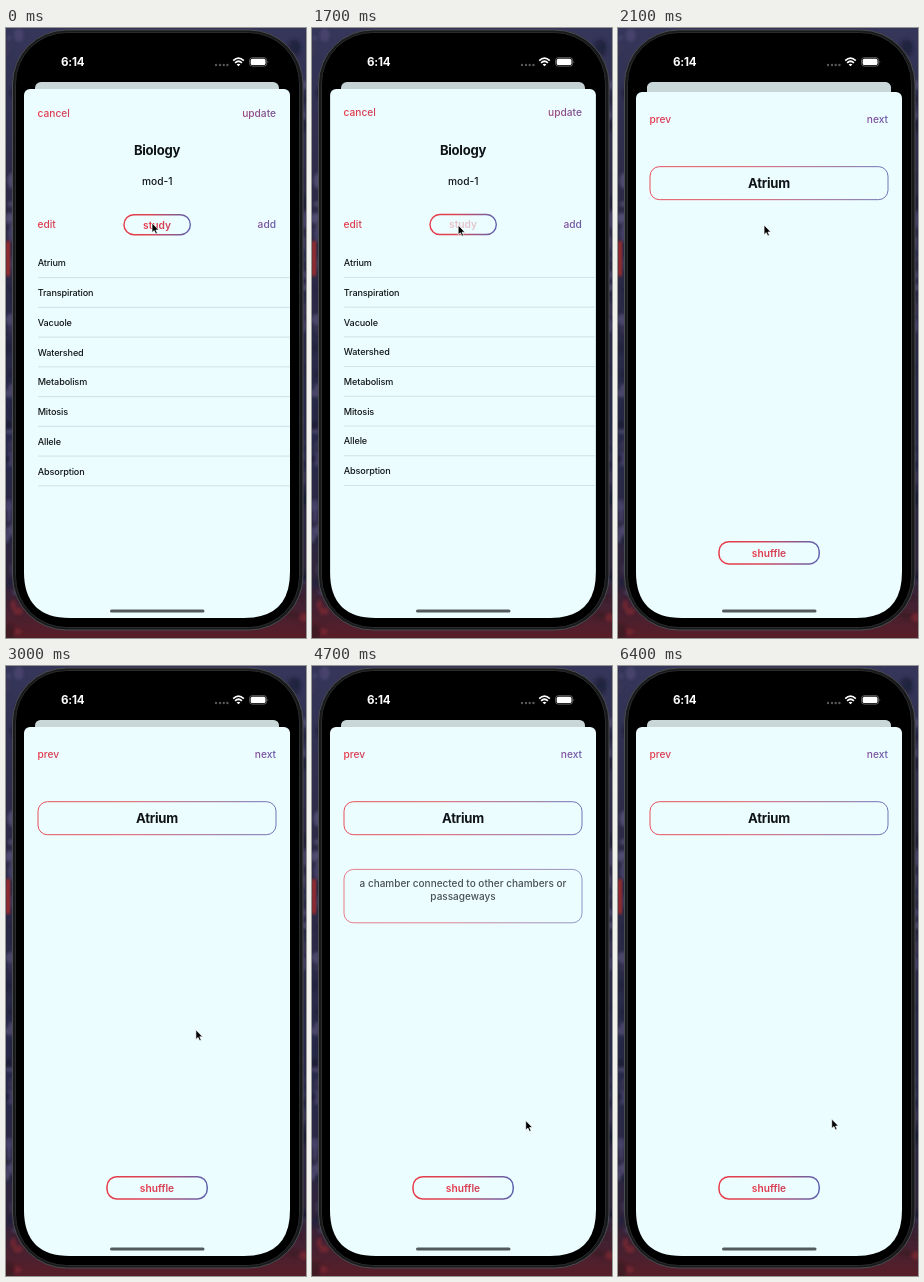
An HTML page that plays this animation: 300 px wide and 610 px high, repeating every 6.5 s.

```html
<!DOCTYPE html>
<html lang="en">
<head>
<meta charset="utf-8">
<title>Flashcards</title>
<style>
  html, body { margin: 0; width: 100%; height: 100%; overflow: hidden; background: #25253c; }
  svg { display: block; width: 300px; height: 610px; font: 500 10.2px Inter, sans-serif; fill: #101416; }
  .title { font-weight: 700; font-size: 13.1px; letter-spacing: -.25px; }
  .row { font-size: 9.1px; letter-spacing: -.12px; }
  .strong { font-weight: 600; }
  .mid { text-anchor: middle; }
  .end { text-anchor: end; }
  .line { fill: none; stroke: url(#edge); }
</style>
</head>
<body>
<svg viewBox="0 0 300 610">
  <defs>
    <linearGradient id="wall" x2="0" y2="1">
      <stop offset="0" stop-color="#35365a"/><stop offset=".3" stop-color="#2c2945"/>
      <stop offset=".7" stop-color="#272a4a"/><stop offset=".9" stop-color="#30243b"/>
      <stop offset="1" stop-color="#581e28"/>
    </linearGradient>
    <linearGradient id="edge">
      <stop offset="0" stop-color="#e63b48"/><stop offset=".4" stop-color="#dc4454"/>
      <stop offset="1" stop-color="#5f63ae"/>
    </linearGradient>
    <linearGradient id="red"><stop stop-color="#e83848"/><stop offset="1" stop-color="#cf4158"/></linearGradient>
    <linearGradient id="plum"><stop stop-color="#a34a7c"/><stop offset="1" stop-color="#775096"/></linearGradient>
    <linearGradient id="violet"><stop stop-color="#86509a"/><stop offset="1" stop-color="#665aa8"/></linearGradient>
    <filter id="soft"><feGaussianBlur stdDeviation="1.5"/></filter>
    <clipPath id="screen"><path d="M18 0H284V544Q284 590 238 590H64Q18 590 18 544Z"/></clipPath>
  </defs>

  <rect width="300" height="610" fill="url(#wall)"/>
  <g id="paint" filter="url(#soft)"></g>
  <rect y="213" width="4" height="35" fill="#a52a2b" filter="url(#soft)"/>

  <rect x="6.5" y="2" width="290.5" height="600" rx="54" fill="#18191b" stroke="#4c4d51"/>
  <rect x="9.5" y="4.5" width="284" height="595" rx="51" fill="#000" stroke="#2b2c2e"/>

  <g fill="#fff">
    <text x="55" y="38.2" font-size="11.6" font-weight="700" letter-spacing="-.2">6:14</text>
    <g fill="#56585a">
      <circle cx="210" cy="37" r="1.2"/><circle cx="214" cy="37" r="1.2"/>
      <circle cx="217.7" cy="37" r="1.2"/><circle cx="221.4" cy="37" r="1.2"/>
    </g>
    <g fill="none" stroke="#fff" stroke-width="1.7">
      <path d="M227.2 32.6Q232.5 27.6 237.8 32.6M229.1 34.9Q232.5 31.6 235.9 34.9"/>
    </g>
    <path d="M230.6 36.4Q232.5 34.9 234.4 36.4L232.5 38.3Z"/>
    <rect x="243.6" y="29.7" width="17" height="8.4" rx="2.6" fill="none" stroke="#77797a" stroke-width=".8"/>
    <rect x="244.7" y="30.8" width="14.8" height="6.2" rx="1.6"/>
    <path d="M261.6 32.5q1.4 1.4 0 2.8z" fill="#77797a"/>
  </g>

  <g clip-path="url(#screen)">
    <rect id="strip" x="29" y="54" width="244" height="40" rx="6" fill="#c9d7d9"/>
    <g id="deck">
      <rect x="18" y="61" width="266" height="560" rx="6" fill="#ecfdff"/>
      <text x="31.5" y="88.5" fill="url(#red)">cancel</text>
      <text class="end" x="270" y="88.5" fill="url(#plum)">update</text>
      <text class="title mid" x="151" y="127">Biology</text>
      <text class="mid" x="151.3" y="156.7">mod-1</text>
      <text x="31.5" y="200.2" fill="url(#red)">edit</text>
      <text class="end" x="270" y="200.2" fill="url(#violet)">add</text>
      <rect class="line" x="118" y="186.7" width="66.3" height="20" rx="9.8" stroke-width="1.4"/>
      <text id="study" class="mid strong" x="151" y="200.6" fill="url(#red)">study</text>
      <g id="rows"></g>
      <rect id="dim" x="18" y="61" width="266" height="560" rx="6" fill="#000"/>
    </g>
    <g id="card">
      <rect x="18" y="61" width="266" height="560" rx="6" fill="#ecfdff"/>
      <text x="31.5" y="92" fill="url(#red)">prev</text>
      <text class="end" x="270" y="92" fill="url(#violet)">next</text>
      <rect class="line" x="32" y="135.7" width="238" height="33" rx="9.5" stroke-width=".9"/>
      <text class="title mid" x="151" y="157.4">Atrium</text>
      <g id="answer">
        <rect class="line" x="32" y="203.4" width="238" height="53.4" rx="9.5" stroke-width=".9"/>
        <text class="mid" font-size="10" x="151" y="221">a chamber connected to other chambers or</text>
        <text class="mid" font-size="10" x="151" y="234">passageways</text>
      </g>
      <rect class="line" x="101" y="510.7" width="100.2" height="22.3" rx="9.8" stroke-width="1.5"/>
      <text class="mid strong" x="151" y="525.6" fill="url(#red)">shuffle</text>
    </g>
  </g>
  <rect x="104" y="581.6" width="94.5" height="3" rx="1.5" fill="#535a5c"/>
  <path id="cursor" d="M0 0V9.6L2.2 7.6L3.8 11L5.4 10.3L3.9 7H6.8Z" fill="#000" stroke="#fff" stroke-width=".7"/>
</svg>
<script>
const LOOP = 6500, STEP = 100;
const el = id => document.getElementById(id);
const clamp = v => Math.min(1, Math.max(0, v));
const ease = v => v * v * (3 - 2 * v);

const terms = ['Atrium', 'Transpiration', 'Vacuole', 'Watershed', 'Metabolism', 'Mitosis', 'Allele', 'Absorption'];
el('rows').innerHTML = terms.map((term, i) => {
  const y = 29.75 * i;
  return `<text class="row" x="31.7" y="${238.3 + y}">${term}</text>
    <path d="M32 ${249.6 + y}H284" stroke="#cfdfe2" stroke-width=".9"/>`;
}).join('');

// Blurred wallpaper strokes along the visible margins
let seed = 11;
const random = () => (seed = seed * 16807 % 2147483647) / 2147483647;
const tones = ['#4d4872', '#171a30', '#3d3555', '#20213d', '#545075'];
el('paint').innerHTML = Array.from({ length: 120 }, () => {
  const x = random() < .5 ? random() * 16 : 284 + random() * 16;
  const y = random() * 610;
  const tone = y > 565 ? (random() < .5 ? '#7c2630' : '#3b1722') : tones[Math.floor(random() * 5)];
  return `<ellipse cx="${x}" cy="${y}" rx="${2 + random() * 5}" ry="${2 + random() * 7}" fill="${tone}" opacity=".75"/>`;
}).join('');

// Piecewise eased track made of [time, value, ...] steps
function track(steps, t) {
  const next = steps.findIndex(s => s[0] > t);
  if (next < 0) return steps[steps.length - 1].slice(1);
  if (next === 0) return steps[0].slice(1);
  const a = steps[next - 1], b = steps[next];
  const k = ease((t - a[0]) / (b[0] - a[0]));
  return a.slice(1).map((v, i) => v + (b[i + 1] - v) * k);
}

// Critically damped spring for the sheet
function spring(ms) {
  const x = Math.max(0, ms) * .018;
  return 1 - (1 + x) * Math.exp(-x);
}

const pointer = [[0, 146, 195], [900, 146.4, 197.3], [2400, 146, 197], [3400, 213.7, 454.5], [5700, 213.7, 454.5], [6200, 213.7, 453]];
const press = [[1500, 1], [1600, .3], [1700, .3], [2000, 1]];
const reveal = [[4500, 0], [4800, 1], [5900, 1], [6200, 0]];

function draw(t) {
  const p = spring(t - 1692);
  el('deck').setAttribute('transform', `translate(151 ${61 - 7 * p}) scale(${1 - .083 * p}) translate(-151 -61)`);
  el('dim').setAttribute('opacity', .15 * p);
  el('strip').setAttribute('opacity', clamp(1 - 2 * p));
  el('card').setAttribute('transform', `translate(0 ${549 * (1 - p)})`);
  el('study').setAttribute('opacity', track(press, t)[0]);
  el('answer').setAttribute('opacity', track(reveal, t)[0]);
  el('cursor').setAttribute('transform', `translate(${track(pointer, t).join(' ')})`);
}

function tick() {
  const t = performance.now() % LOOP;
  draw(Math.floor(t / STEP) * STEP);
  requestAnimationFrame(tick);
}
tick();
</script>
</body>
</html>
```
